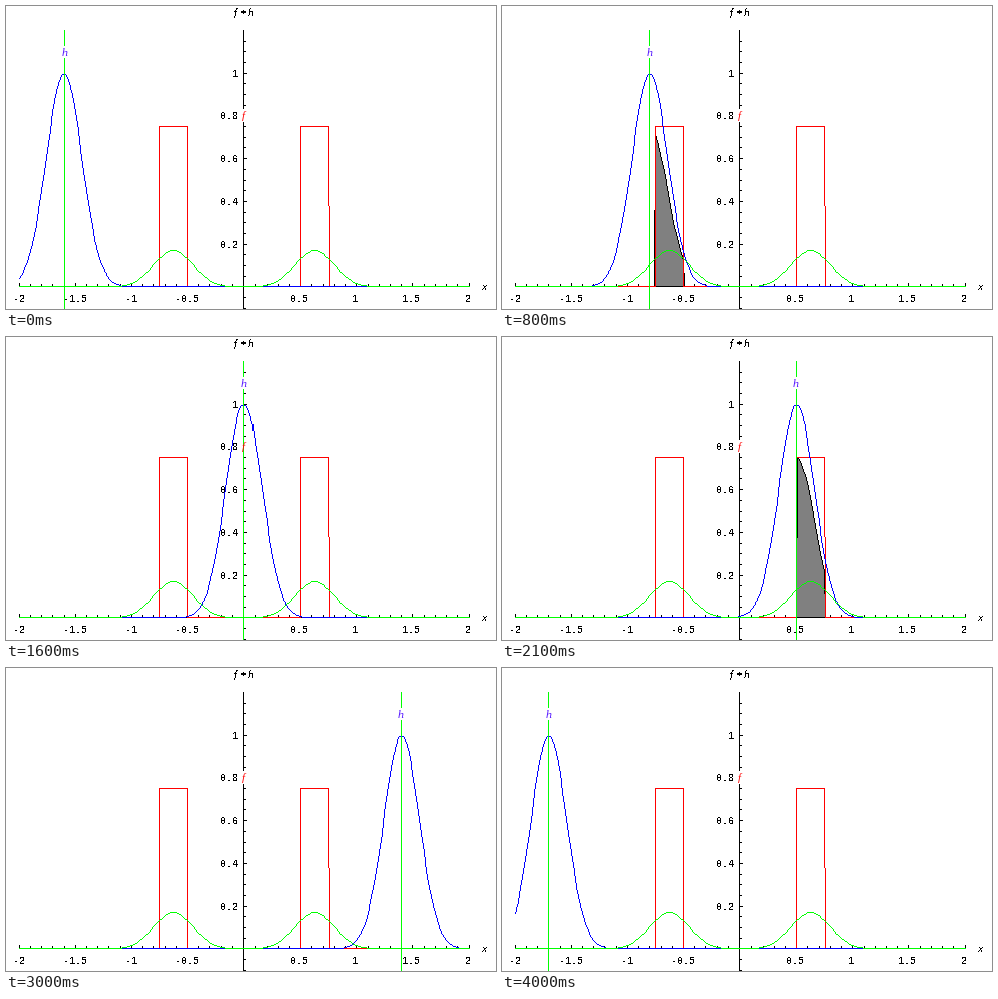
Recreate the animation shown at these times as a matplotlib script. Size 490 px wide and 303 px high, loop 4.1 s.

```python
import math

import matplotlib.pyplot as plt
import numpy as np
from matplotlib.animation import FuncAnimation

W, H, DPI = 490, 303, 100
PX = 72 / DPI                 # one pixel in points
STEPS, START = 41, 4          # kernel centres from -2 to 2 in tenths
SHARP, HEIGHT = 20, 0.75      # kernel exp(-20 x^2), box height
LEAN = 0.0045                 # slant of a falling box edge
BOXES = [(-0.75, -0.5), (0.5, 0.75)]
TOP, BASE, BOTTOM = 24, 280, 302

WHITE, BLACK, GRAY = (255, 255, 255), (0, 0, 0), (128, 128, 128)
RED, GREEN, BLUE = (255, 0, 0), (0, 255, 0), (0, 0, 255)

plt.rcParams["text.hinting"] = "default"
plt.rcParams["text.hinting_factor"] = 1

fig = plt.figure(figsize=(W / DPI, H / DPI), dpi=DPI, facecolor="white")
ax = fig.add_axes([0, 0, 1, 1])


def sx(x):
    return 237.6 + 112.2 * np.asarray(x, float)


def sy(y):
    return 280.9 - 213.8 * np.asarray(y, float)


def col(x):
    return np.floor(sx(x) + 1e-6).astype(int)


def row(y):
    return np.floor(sy(y) + 1e-6).astype(int)


def stroke(img, cols, rows, color):
    """Crisp one-pixel polyline through whole pixels."""
    for c0, r0, c1, r1 in zip(cols, rows, cols[1:], rows[1:]):
        n = max(abs(c1 - c0), abs(r1 - r0)) + 1
        cs = np.rint(np.linspace(c0, c1, n)).astype(int)
        rs = np.rint(np.linspace(r0, r1, n)).astype(int)
        img[rs, cs] = color


def curve(img, x, y, color):
    stroke(img, col(x), row(y), color)


def kernel(d):
    return np.exp(-SHARP * d * d)


def blur(x):
    """Boxes convolved with the kernel."""
    k = math.sqrt(SHARP)
    erf = np.vectorize(math.erf)
    total = sum(erf(k * (b - x)) - erf(k * (a - x)) for a, b in BOXES)
    return HEIGHT * math.sqrt(math.pi) / (2 * k) * total


def text(x, y, s, size=10, color="black", smooth=False, ha="center",
         family="Liberation Mono", style="normal"):
    return ax.text(x, y, s, fontsize=size * PX, color=color, ha=ha,
                   va="baseline", family=family, style=style,
                   antialiased=smooth)


def symbol(x, y, s, **kw):
    return text(x, y, s, size=11, family="Liberation Serif",
                style="italic", **kw)


def draw_axes(img):
    axis = int(col(0))
    img[BASE, col(-2):col(2) + 1] = BLACK
    img[TOP:BOTTOM + 1, axis] = BLACK
    for i in range(-20, 21):
        x = int(col(i / 10))
        major = i % 5 == 0
        img[BASE - (3 if major else 2):BASE, x] = BLACK
        if major and i:
            text(x + 0.5, 295.5, f"{i / 10:g}")
    for i in range(-2, 24):
        y = int(row(i / 20))
        major = i % 4 == 0
        img[y, axis:axis + (4 if major else 3)] = BLACK
        if major and i:
            text(232.5, y + 4, f"{i / 20:g}", ha="right")


def draw_product(img, c):
    """Shaded product of the kernel with each box."""
    for a, b in BOXES:
        foot, top = (a - LEAN, a) if a < 0 else (a, a + 2 * LEAN)
        xs = np.linspace(top, b, 14)
        x = np.r_[foot, xs, b + LEAN]
        y = np.r_[0, HEIGHT * kernel(xs - c), 0]
        for k in range(int(col(a)), int(col(b)) + 1):
            start = math.floor(np.interp(k + 0.5, sx(x), sy(y)))
            img[start:BASE, k] = GRAY
        curve(img, np.r_[x, foot], np.r_[y, 0], BLACK)


grid = np.linspace(-2, 2, 161)
smoothed = blur(grid)
box_x, box_y = [-2], [0]
for a, b in BOXES:
    fall = LEAN if b > 0 else 0
    box_x += [a, a, b, b + fall]
    box_y += [0, HEIGHT, HEIGHT, 0]
box_x.append(2)
box_y.append(0)

paper = np.full((H, W, 3), WHITE, np.uint8)
draw_axes(paper)
picture = ax.imshow(paper, extent=(0, W, H, 0), interpolation="nearest",
                    aspect="auto")
ax.set_xlim(0, W)
ax.set_ylim(H, 0)
ax.axis("off")

symbol(229.5, 10, "f")
symbol(236.5, 12, "*")
symbol(244.5, 10, "h")
symbol(478.5, 284, "x")
symbol(237.5, 113, "f", color="#ff0000", smooth=True)
label = symbol(0, 49.5, "h", color="#5010ff", smooth=True)


def update(i):
    c = ((START + i) % STEPS - 20) / 10
    x = int(col(c))
    img = paper.copy()
    draw_product(img, c)
    curve(img, box_x, box_y, RED)
    curve(img, grid, kernel(grid - c), BLUE)
    curve(img, grid, smoothed, GREEN)
    img[103:116, 234:242] = WHITE
    img[TOP:BOTTOM + 1, x] = GREEN
    img[40:52, x - 4:x + 5] = WHITE
    picture.set_data(img)
    label.set_x(x + 0.5)
    return []


anim = FuncAnimation(fig, update, frames=STEPS, interval=100,
                     init_func=lambda: update(0), repeat=True,
                     repeat_delay=0, blit=False)
plt.show()
```
